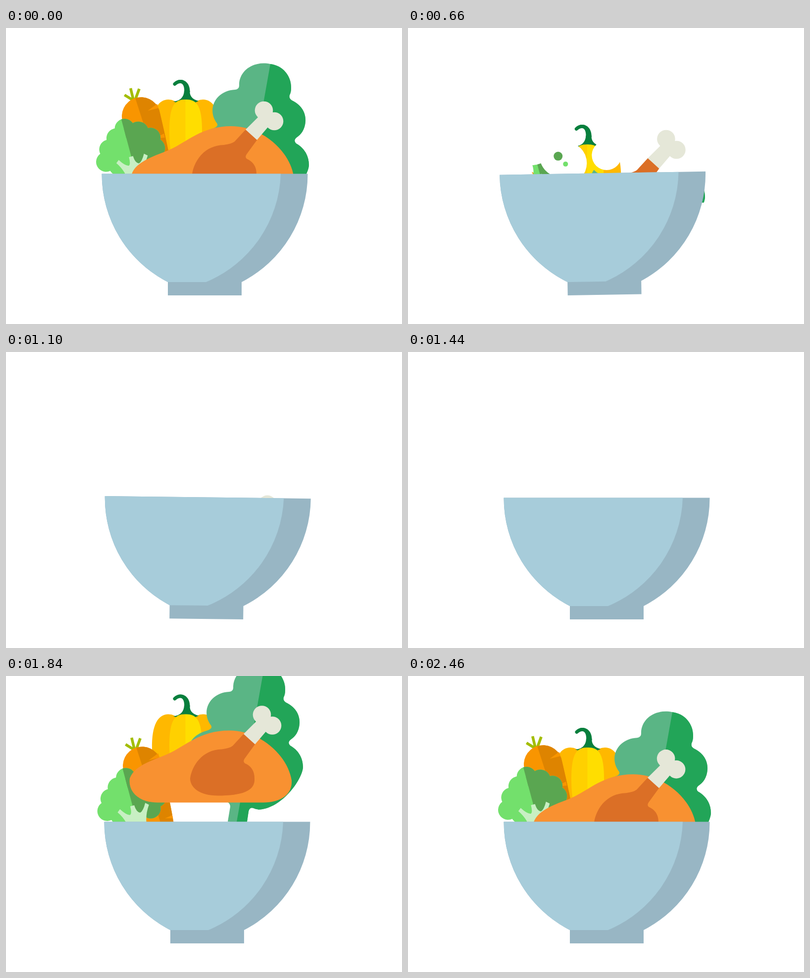
Write an HTML page that moves like this. It is 800 px wide and 600 px high and loops after 2.48 s.

```html
<!DOCTYPE html>
<html lang="en">
<head>
<meta charset="utf-8">
<title>Salad bowl</title>
<style>
  html, body { margin: 0; width: 100%; height: 100%; overflow: hidden; background: #fff; }
  svg { display: block; width: 800px; height: 600px; }
</style>
</head>
<body>
<svg viewBox="0 0 800 600">
  <defs>
    <clipPath id="inside"><rect width="800" height="354"/></clipPath>
    <clipPath id="leafHalf"><path d="M534 73L476 400H700V60H536Z"/></clipPath>
    <clipPath id="headHalf"><path d="M256 130L248 260H340V130Z"/></clipPath>
    <path id="leaf" d="M534 73C560 76 577 98 576 122Q576 130 573 136Q571 143 578 147C595 155 606 170 605 189C604 206 596 216 587 222Q580 228 586 234C602 243 612 258 612 278C611 300 575 355 530 363Q520 365 512 361Q504 358 502 368L498 395L460 388L465 358Q465 350 455 346C400 345 380 275 380 247C380 225 394 210 420 203Q430 199 426 193C405 165 423 127 463 125Q472 124 471 114C472 86 500 66 534 73Z"/>
    <g id="head">
      <circle cx="199" cy="207" r="20"/><circle cx="213" cy="185" r="20"/>
      <circle cx="234" cy="168" r="20"/><circle cx="256" cy="155" r="20"/>
      <circle cx="280" cy="170" r="21"/><circle cx="300" cy="189" r="20"/>
      <circle cx="302" cy="212" r="20"/><circle cx="284" cy="230" r="20"/>
      <circle cx="221" cy="223" r="20"/>
      <path d="M199 207L234 168L256 155L300 189L302 212L284 232L262 236H235L221 226Z"/>
    </g>
  </defs>

  <g clip-path="url(#inside)">
    <g id="pepper"><g class="food">
      <path fill="#ffb800" d="M295 215C294 165 308 145 328 145Q342 145 352 158L352 296C318 300 297 260 295 215ZM431 215C432 165 418 145 398 145Q384 145 374 158L374 296C408 300 429 260 431 215Z"/>
      <path fill="#087f3d" d="M338 149Q359 147 360 127L371.5 127Q370 143 389 148L378 153Q363 140 350 153Z"/>
      <path fill="none" stroke="#087f3d" stroke-width="7" stroke-linecap="round" d="M341 113.500Q348 107 356 109"/>
      <path fill="#087f3d" d="M341 110Q346 105 353 105C366 106 372 117 371.500 130L360 132C361 119 358 112 351 111Z"/>
      <path fill="#ffd000" d="M363 145C345 145 330 150 330 208C330 262 341 300 363 300Z"/>
      <path fill="#ffde00" d="M362.500 145C381 145 396 150 396 208C396 262 385 300 362.500 300Z"/>
    </g></g>

    <g id="lettuce"><g class="food">
      <use href="#leaf" fill="#5ab585"/>
      <use href="#leaf" fill="#22a558" clip-path="url(#leafHalf)"/>
    </g></g>

    <g id="carrot"><g class="food"><g transform="translate(10 78) rotate(7 262 100)">
      <path fill="none" stroke="#a3bd00" stroke-width="5.500" d="M244 71L224.500 62M244 71L235 47M247 70L252.500 46"/>
      <path fill="#f99500" d="M228 118A38.500 38.500 0 1 1 298 84C318 138 352 232 356 280Q357 293 345 290C318 272 278 206 228 118Z"/>
      <path fill="#de8400" d="M247 66A38.500 38.500 0 0 1 298 84C318 138 352 232 356 280Q357 292 351 291ZM231 121Q244 117 257 119L237 128ZM305 243L327 242L311 250Z"/>
      <path fill="#f99500" d="M292 72L275 88L296 80ZM313 130L296 142L316 138ZM335 193L322 201L338 199Z"/>
    </g></g></g>

    <g id="broccoli"><g class="food"><g transform="translate(2 48) rotate(-18.500 250 212)">
      <use href="#head" fill="#73e06c"/>
      <use href="#head" fill="#5aa651" clip-path="url(#headHalf)"/>
      <path fill="#c8efc3" d="M230 273.500L264 276Q264 245 283 221.500L277 215.500Q268 230 261 231Q254 228 254.500 213L246 212.500Q245 228 240 229Q233 227 224.500 211.500L218 216Q232 238 230 273.500Z"/>
    </g></g></g>

    <g id="chicken">
      <g class="food">
        <path fill="#f89131" d="M254 296C264 268 306 258 332 246C366 231 395 199 455 199C520 199 574 252 581 300C583 328 560 345 524 345H310C275 345 250 325 254 296Z"/>
      </g>
      <g fill="#e5e7d8">
        <circle cx="521" cy="167" r="18.300"/><circle cx="542" cy="189" r="18.300"/>
        <path d="M483 207L511 179L521 167L542 189L530 200L507 227Z"/>
      </g>
      <path fill="#db6f26" d="M376 296C380 270 400 238 440 237Q456 235 462 230L484 206L507 227L486 256Q481 264 490 267Q506 276 506 296C508 322 480 331 432 331C396 331 376 315 376 296Z"/>
    </g>
  </g>

  <g id="bowl">
    <path fill="#98b6c4" d="M193.500 295.500H609.500A246 246 0 0 1 476 515V542H327V515A246 246 0 0 1 193.500 295.500Z"/>
    <path fill="#a7ccda" d="M193.500 295.500H555A246 246 0 0 1 404 515H327A246 246 0 0 1 193.500 295.500Z"/>
  </g>
</svg>

<script>
const LOOP = 2480, EATEN = 1200, HALF = 660, CRUMB_LIFE = 130;
const SHAKE = 180, SHAKE_END = 1170, LAND_START = 1710, LAND_END = 2430;
const FALL_SPEED = 1.5;
const $ = id => document.getElementById(id);
const clamp = v => Math.max(0, Math.min(1, v));

// depth: how far it has sunk at HALF; start and gap: timing of the bites [x, y, radius].
const foods = [
  { id: 'broccoli', pivot: [252, 260], depth: 36, curve: 1.12, drift: 13.5,
    land: 1712, lean: 18.5, slide: -2, colors: ['#5aa651', '#73e06c'], start: 50, gap: 180,
    bites: [[237, 197, 45], [194, 256, 46], [320, 235, 30], [297, 222, 45], [245, 245, 48]] },
  { id: 'carrot', pivot: [272, 178], depth: 85, curve: 1.15, drift: 8,
    land: 1732, lean: -7, slide: -10, colors: ['#f99500', '#de8400'], start: 380, gap: 60,
    bites: [[270, 165, 50], [300, 200, 50]] },
  { id: 'pepper', pivot: [363, 220], depth: 91, curve: 2.1, drift: 4.5, sway: 6,
    land: 1885, bounce: 4, colors: ['#ffd000', '#ffb800'], start: 80, gap: 350,
    bites: [[319, 183, 43], [402, 167, 30], [352, 125, 34]] },
  { id: 'lettuce', pivot: [500, 300], depth: 65, curve: 1.32, drift: -8.5, sway: 4,
    land: 1902, slide: -12, bounce: 30, colors: ['#22a558', '#5ab585'], start: 135, gap: 190,
    bites: [[522, 109, 66], [432, 178, 63], [547, 190, 71]] },
  { id: 'chicken', pivot: [420, 300], depth: 58, curve: 1.75, drift: 3, sway: 3, rock: 10,
    land: 1899, slide: -4, bounce: 40, colors: ['#f9a55c', '#f58c2f'], start: 90, gap: 150,
    bites: [[450, 213, 62], [356, 230, 41], [540, 225, 50]] }
];

function add(parent, tag, attrs) {
  const el = document.createElementNS('http://www.w3.org/2000/svg', tag);
  for (const k in attrs) el.setAttribute(k, attrs[k]);
  return parent.appendChild(el);
}

function build(food) {
  const name = food.id + 'Bites';
  food.el = $(food.id);
  const mask = add(document.querySelector('defs'), 'mask',
    { id: name, maskUnits: 'userSpaceOnUse', x: 0, y: 0, width: 800, height: 600 });
  add(mask, 'rect', { width: 800, height: 600, fill: '#fff' });
  food.el.querySelector('.food').setAttribute('mask', `url(#${name})`);
  food.bites = food.bites.map(([x, y, r], i) => ({
    x, r, time: food.start + i * food.gap,
    hole: add(mask, 'circle', { cx: x, cy: y }),
    crumbs: [
      add(food.el, 'circle', { cx: x - 5, cy: y - 6, r: 9, fill: food.colors[0] }),
      add(food.el, 'circle', { cx: x + 10, cy: y + 10, r: 5, fill: food.colors[1] })
    ]
  }));
}

// Sideways shake from -1 to 1, while eating and while the food lands.
function shake(t) {
  if (t < SHAKE_END) return Math.sin(2 * Math.PI * t / SHAKE);
  if (t < LAND_START || t > LAND_END) return 0;
  return -Math.sin(2 * Math.PI * (t - LAND_START) / SHAKE);
}

function pose({ depth, curve, drift, sway = 0, rock = 0, land, lean = 0, slide = 0, bounce = 8 }, t) {
  const s = shake(t), u = t / HALF;
  if (t < EATEN) return [drift * u + sway * s, depth * u ** curve, rock * s * clamp(1 - u)];
  const age = t - land, left = clamp(-age / 30);
  if (age < 0) return [slide * left, age * FALL_SPEED, lean * left];
  const y = bounce * Math.exp(-age / 110) * Math.sin(Math.PI * age / 230);
  return [5 * s * clamp(age / 250), y, bounce > 30 ? y * .2 : 0];
}

function place(el, [x, y, a], [cx, cy]) {
  el.setAttribute('transform', `translate(${x} ${y}) rotate(${a} ${cx} ${cy})`);
}

function drawBite({ x, r, time, hole, crumbs }, t) {
  const age = t - time, flying = age >= 0 && age < CRUMB_LIFE;
  hole.setAttribute('r', age >= 0 && t < EATEN ? r : 0);
  for (const c of crumbs) {
    c.setAttribute('visibility', flying ? 'visible' : 'hidden');
    if (flying) place(c, [35 * Math.cos(x) * age / CRUMB_LIFE, (age / 25) ** 2, 0], [0, 0]);
  }
}

function draw(now) {
  const t = now % LOOP, s = shake(t);
  for (const food of foods) {
    place(food.el, pose(food, t), food.pivot);
    food.bites.forEach(bite => drawBite(bite, t));
  }
  const tilt = t > 400 && t < EATEN ? 1.1 * s : 0;
  place($('bowl'), [5 * s, -1.3 * Math.abs(tilt), tilt], [401.5, 542]);
}

foods.forEach(build);
draw(0);
let begin;
requestAnimationFrame(function tick(now) {
  begin ??= now;
  draw(now - begin);
  requestAnimationFrame(tick);
});
</script>
</body>
</html>
```
